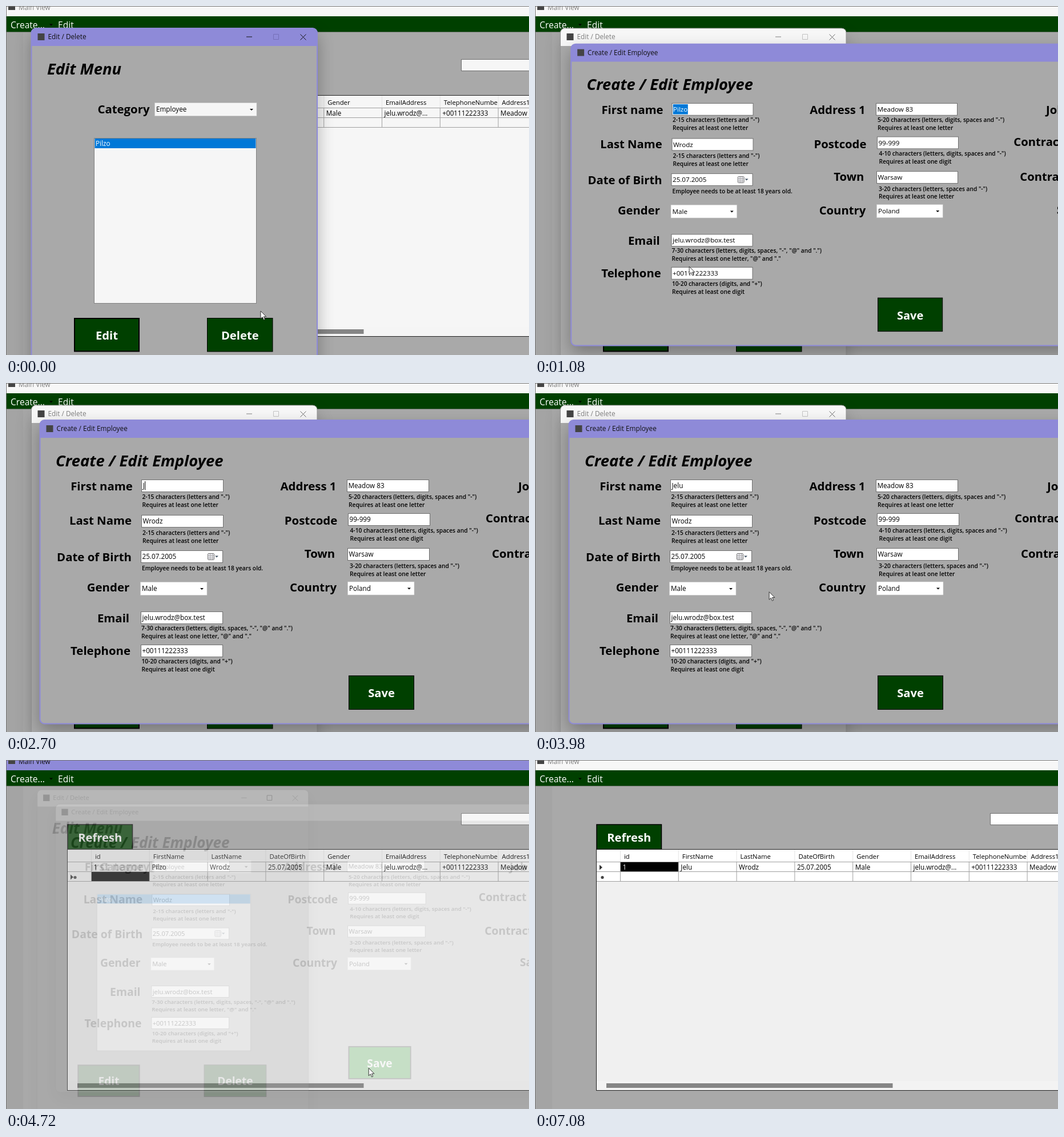
Write an HTML page that moves like this. It is 916 px wide and 611 px high and loops after 7.1 s.

```html
<!DOCTYPE html>
<html lang="en">
<head>
<meta charset="utf-8">
<title>Edit employee</title>
<style>
html, body { margin: 0; width: 100%; height: 100%; overflow: hidden; background: #a9a9a9; }
svg { display: block; width: 100vw; height: 100vh; }
text { font-family: "Open Sans", "Noto Sans", sans-serif; white-space: pre; }
.bar { fill: #f7f7f7; }
.name { fill: #808080; }
.cross { fill: none; stroke: #6c6c6c; }
.edge { fill: none; stroke: #949494; stroke-width: 1; }
.shadow { filter: blur(15px); opacity: .19; }
.active > .bar { fill: #8e8ad8; }
.active > .name { fill: #111; }
.active > .cross { stroke: #111; }
.active > .edge { stroke: #8e8ad8; stroke-width: 2; }
.active > .shadow { opacity: .3; }
</style>
</head>
<body>
<svg id="stage" viewBox="0 0 916 611"></svg>
<script>
const LOOP = 7100;
const GREEN = '#004000', HOVER = '#008000', GRAY = '#a9a9a9', BLUE = '#0078d7';
const OLD_NAME = 'Pilzo', NEW_NAME = 'Jelu', LAST_NAME = 'Wrodz', BIRTH = '25.07.2005';
const PHONE = '+00111222333', STREET = 'Meadow 83';
const KEY_TIMES = [2700, 2950, 3070, 3300];

// ---- markup helpers; text is placed by the middle of its capitals ----
const text = (s, x, y, size, attrs = '') =>
  `<text x="${x}" y="${y + size * .36}" font-size="${size}" ${attrs}>${s}</text>`;
const rect = (x, y, w, h, fill, attrs = '') =>
  `<rect x="${x}" y="${y}" width="${w}" height="${h}" fill="${fill}" ${attrs}/>`;
const line = (x1, y1, x2, y2, color) =>
  `<path d="M${x1} ${y1}L${x2} ${y2}" stroke="${color}"/>`;
const label = (s, x, y, anchor = 'middle') =>
  text(s, x, y, 20.4, `font-weight="700" text-anchor="${anchor}"`);
const heading = (s, x, y) => text(s, x, y, 27.4, 'font-weight="700" font-style="italic"');
const value = (s, x, y, attrs = '') => text(s, x, y, 11.7, attrs);
const hints = (x, y, ...rows) =>
  rows.map((s, i) => text(s, x, y + i * 14, 10.25, 'font-weight="600"')).join('');
const arrow = (x, y) => `<path d="M${x - 3} ${y - 1.5}h6l-3 3z"/>`;
const field = (s, x, y, w = 143, h = 21) =>
  rect(x, y, w, h, 'var(--paper)', 'stroke="#707070"') + value(s, x + 2, y + h / 2);
const combo = (s, x, y, w) =>
  rect(x, y, w, 23, 'var(--paper)', 'stroke="#c8c8c8" stroke-width=".6"') +
  value(s, x + 2.5, y + 11.7) + arrow(x + w - 9, y + 12);
const button = (id, s, x, y, w, h, stroke) =>
  rect(x, y, w, h, GREEN, `id="${id}" stroke="#000" stroke-width="${stroke}"`) +
  text(s, x + w / 2, y + h / 2 + 1, 20.2, 'fill="#fff" font-weight="700" text-anchor="middle"');

function dialog(id, title, x, y, w, h, content) {
  const bar = `M${x} ${y + 31}v-23q0-8 8-8h${w - 16}q8 0 8 8v23z`;
  return `<g id="${id}">
    ${rect(x, y + 12, w, h, '#000', 'class="shadow"')}
    ${rect(x, y, w, h, GRAY, 'rx="8"')}
    <path class="bar" d="${bar}"/>
    ${rect(x + 11, y + 9, 12, 12, '#444')}
    ${text(title, x + 29, y + 15, 11.8, 'class="name"')}
    ${content}
    ${rect(x, y, w, h, 'none', 'rx="8" class="edge"')}
  </g>`;
}

// ---- main window ----
function table() {
  const heads = ['id', 'FirstName', 'LastName', 'DateOfBirth', 'Gender',
    'EmailAddress', 'TelephoneNumbe', 'Address1'];
  const cells = ['1', OLD_NAME, LAST_NAME, BIRTH, 'Male', 'jelu.wrodz@...', PHONE, STREET];
  const colX = i => 149.5 + i * 101.8;
  let out = rect(107.5, 156.5, 820, 422, 'var(--grid)', 'stroke="#222"') +
    rect(108, 157, 808, 55.5, 'var(--paper)') +
    rect(150, 196, 101, 16, '#000', 'id="pick"');
  for (const y of [178.5, 195.5, 212.5]) out += line(108, y, 916, y, '#a0a0a0');
  heads.forEach((head, i) => {
    const x = colX(i);
    out += line(x, 157, x, 178, '#e4e4e4') + line(x, 178, x, 212, '#a0a0a0') +
      text(head, x + 6.5, 168.5, 11.3) + value(cells[i], x + 4, 188, `id="cell${i}"`);
  });
  return out +
    '<path id="rowMark" fill="#333" d="M113 183.500l5 4.500-5 4.500z"/>' +
    '<circle id="newMark" cy="205.500" r="2.600" fill="#444"/>' +
    rect(108, 562, 808, 16, '#f5f5f5', 'opacity=".6"') + rect(125, 566, 501.5, 8, '#858585');
}

const mainWindow = `<g id="main">
  ${rect(0, 0, 916, 611, GRAY)}${rect(0, 46, 30, 565, '#a4a4a4')}
  ${rect(0, 0, 916, 18, '', 'class="bar"')}
  ${rect(4, -4, 12, 11, '#444')}
  ${text('Main View', 22, 3, 11.7, 'class="name"')}
  ${rect(0, 18, 916, 27, GREEN)}${line(0, 45.5, 916, 45.5, '#5c6b5c')}
  ${text('Create...', 8, 33, 15.6, 'fill="#fff" font-weight="500"')}
  ${text('Edit', 91, 33, 15.6, 'fill="#fff" font-weight="500"')}
  ${arrow(79, 33)}
  ${line(.5, 0, .5, 611, '#777')}${line(0, .5, 916, .5, '#777')}
  ${rect(797.5, 93.5, 130, 20, 'var(--paper)', 'stroke="#707070"')}
  ${button('refresh', 'Refresh', 108, 113, 113.5, 43.5, 1.5)}
  ${table()}
</g>`;

// ---- dialogs ----
const menuContent = `
  <path class="name" d="M421 53.500h10v1h-10z"/>
  <path id="maximise" fill="none" d="M468.500 49.500h9v9h-9z"/>
  <path class="cross" d="M515.500 49.500l10 10m0-10l-10 10"/>
  ${heading('Edit Menu', 72, 110)}
  ${label('Category', 206, 181)}
  ${combo('Employee', 260.5, 169.5, 178.5)}
  ${rect(154.5, 231.5, 284, 289, 'var(--paper)', 'stroke="#828282"')}
  ${rect(155.5, 232, 282, 17, BLUE)}${value(OLD_NAME, 157, 241, 'fill="#fff"')}
  ${button('edit', 'Edit', 120, 547, 113, 57.5, 2)}
  ${button('delete', 'Delete', 352.5, 546.5, 114.5, 58.5, 1)}`;

const LETTER = 'Requires at least one letter', DIGIT = 'Requires at least one digit';
const formContent = `
  ${heading('Create / Edit Employee', 87, 136)}
  ${[['First name', 167.5, 181], ['Last Name', 165.5, 241], ['Date of Birth', 154.5, 305],
     ['Gender', 179, 358], ['Email', 188, 411.5], ['Telephone', 165.5, 469],
     ['Address 1', 529.5, 181], ['Postcode', 534, 241], ['Town', 549.5, 299],
     ['Country', 538, 358]].map(a => label(...a)).join('')}
  ${[['Job Title', 897, 181], ['Contract Start', 840, 237], ['Contract End', 851, 299],
     ['Salary', 916, 357]].map(a => label(...a, 'start')).join('')}
  ${field('', 237.5, 169.5)}
  ${value('', 239.5, 180, 'id="first"')}
  <clipPath id="chosen"><rect id="chosenBox" x="239" y="171" width="0" height="18"/></clipPath>
  <g clip-path="url(#chosen)">${rect(239, 171, 60, 18, BLUE)}
    ${value(OLD_NAME, 239.5, 180, 'fill="#fff"')}</g>
  ${rect(0, 172, 1, 15.5, '#000', 'id="caret"')}
  ${hints(238.5, 199, '2-15 characters (letters and "-")', LETTER)}
  ${field(LAST_NAME, 237.5, 231.5)}
  ${hints(239, 262, '2-15 characters (letters and "-")', LETTER)}
  ${field(BIRTH, 236.5, 293.5)}
  ${rect(353.5, 298.5, 11, 11, '#e8e8ee', 'rx="1.5" stroke="#777"')}
  <path stroke="#aaa" d="M354 302.500h10M354 306.500h10M357.500 299v10M361.500 299v10"/>
  <path fill="#456" d="M366 302.500h6l-3 3z"/>
  ${hints(238, 324, 'Employee needs to be at least 18 years old.')}
  ${combo('Male', 235.5, 348.5, 116.5)}
  ${field('jelu.wrodz@box.test', 236.5, 400.5)}
  ${hints(237, 429.5, '7-30 characters (letters, digits, spaces, "-", "@" and ".")',
          'Requires at least one letter, "@" and "."')}
  ${field(PHONE, 236.5, 458.5)}
  ${hints(237.5, 487.5, '10-20 characters (digits, and "+")', DIGIT)}
  ${field(STREET, 597.5, 169.5)}
  ${hints(600, 199, '5-20 characters (letters, digits, spaces and "-")', LETTER)}
  ${field('99-999', 599.5, 228.5)}
  ${hints(602.5, 258, '4-10 characters (letters, digits, spaces and "-")', DIGIT)}
  ${field('Warsaw', 598.5, 289.5)}
  ${hints(602, 320, '3-20 characters (letters, spaces and "-")', LETTER)}
  ${combo('Poland', 598.5, 348, 116.5)}
  ${button('save', 'Save', 600.5, 512.5, 114, 59, 1)}`;

const pointer = `<g id="pointer">
  <path id="arrow" fill="#fff" stroke="#222" stroke-width=".9"
    d="M0 0v13.500l3.200-3 2.100 5 2.200-.9-2.100-4.800h4.300z"/>
  <path id="beam" fill="none" stroke="#111" d="M-3 -8h2.500l.5 .5l.5-.5h2.500M0-7.500v15M-3 8h2.500l.5-.5l.5 .5h2.500"/>
</g>`;

const stage = document.getElementById('stage');
stage.innerHTML = mainWindow +
  dialog('menu', 'Edit / Delete', 44.5, 39, 500.5, 640, menuContent) +
  dialog('form', 'Create / Edit Employee', 59.5, 65, 1079, 531.5, formContent) + pointer;
const el = id => document.getElementById(id);
const set = (id, attrs) => {
  for (const name in attrs) el(id).setAttribute(name, attrs[name]);
};
const show = (id, on) => set(id, { visibility: on ? 'visible' : 'hidden' });
const clamp = (v, lo, hi) => Math.min(hi, Math.max(lo, v));

// ---- motion ----
const PATH = [
  [0, 446, 534], [170, 446, 534], [450, 330, 570], [780, 219, 573], [960, 219, 573],
  [1080, 270, 457], [1300, 296, 270], [1520, 283, 190.5], [1710, 283, 190.5], [1830, 290, 182],
  [2020, 290, 179], [2260, 184, 179], [3799, 184, 179], [3800, 278, 182], [4200, 570, 588],
  [4460, 645, 545], [4640, 645, 545], [4720, 636, 540], [5260, 219, 171], [5320, 219, 171],
  [5500, 175, 138], [5690, 175, 138], [6020, 500, 350], [6350, 810, 552], [6410, 810, 552],
  [6600, 878, 418], [6890, 608, 612], [LOOP, 608, 640]];

function pointerAt(t) {
  const i = PATH.findIndex(p => p[0] > t);
  const [t0, x0, y0] = PATH[i - 1], [t1, x1, y1] = PATH[i];
  const k = (t - t0) / (t1 - t0);
  return [x0 + (x1 - x0) * k, y0 + (y1 - y0) * k];
}

function place(id, scale, cx, cy, opacity) {
  set(id, {
    transform: `translate(${cx} ${cy}) scale(${scale}) translate(${-cx} ${-cy})`, opacity
  });
}

function draw(t) {
  const [px, py] = pointerAt(t);
  const inside = (x, y, w, h) => px >= x && px <= x + w && py >= y && py <= y + h;
  const hover = (id, on) => set(id, { fill: on ? HOVER : GREEN });

  const dim = t < 900 || (t >= 4580 && t < 4760);
  stage.style.setProperty('--paper', dim ? '#f6f6f6' : '#fff');
  stage.style.setProperty('--grid', dim ? '#f6f6f6' : '#f0f0f0');

  const active = t < 900 ? 'menu' : t < 4580 ? 'form' : t < 7080 ? 'main' : '';
  for (const id of ['main', 'menu', 'form']) set(id, { class: id === active ? 'active' : '' });
  set('maximise', { stroke: t < 900 ? '#7570b8' : t < 4580 ? '#c4c4c4' : '#222' });

  // form pops in, both dialogs shrink away together
  const closing = clamp((t - 4640) / 100, 0, 1), shrink = 1 - .0625 * closing;
  const opening = clamp((t - 930) / 55, 0, 1);
  const grow = 1 - .082 * Math.exp(-(t - 960) / 49);
  place('menu', shrink, 245, 296, 1 - closing);
  place('form', t < 930 ? .9 : t < 1400 ? grow : shrink, 599, 303, opening * (1 - closing));

  hover('edit', t < 900 && inside(120, 546, 114, 59));
  hover('save', t > 3800 && t < 4745 && inside(600, 512, 115, 59));
  hover('refresh', t > 5260 && inside(107, 112, 115, 44));
  set('save', { 'stroke-width': t < 4460 ? 1 : 2 });

  // first name: drag selection, then typing
  const typed = KEY_TIMES.filter(k => t >= k).length;
  const first = el('first');
  first.textContent = typed ? NEW_NAME.slice(0, typed) : OLD_NAME;
  const end = 240 + first.getComputedTextLength();
  const start = t < 2020 ? 239 : clamp(px, 239, end);
  set('chosenBox', { x: start, width: typed ? 0 : end - start });
  set('caret', { x: end });
  show('caret', typed && t < 4580 && (t < 3800 || t >= 4330));

  const fresh = t >= 5690;
  el('cell1').textContent = fresh ? NEW_NAME : OLD_NAME;
  set('pick', { y: fresh ? 179 : 196 });
  set('cell0', { fill: fresh ? '#fff' : '#000' });
  set('rowMark', { transform: fresh ? '' : 'translate(0 17)' });
  set('newMark', { cx: fresh ? 118 : 121 });

  const beam = (t >= 2020 && t < 2700) || (t > 1500 && t < 4000 && inside(238, 169, 143, 21));
  set('pointer', { transform: `translate(${px} ${py})` });
  show('pointer', (t < 2700 || t >= 3800) && t < 6890);
  set('arrow', { display: beam ? 'none' : 'inline' });
  set('beam', { display: beam ? 'inline' : 'none' });
}

const began = performance.now();
function tick() {
  draw((performance.now() - began) % LOOP);
  requestAnimationFrame(tick);
}
tick();
</script>
</body>
</html>
```
